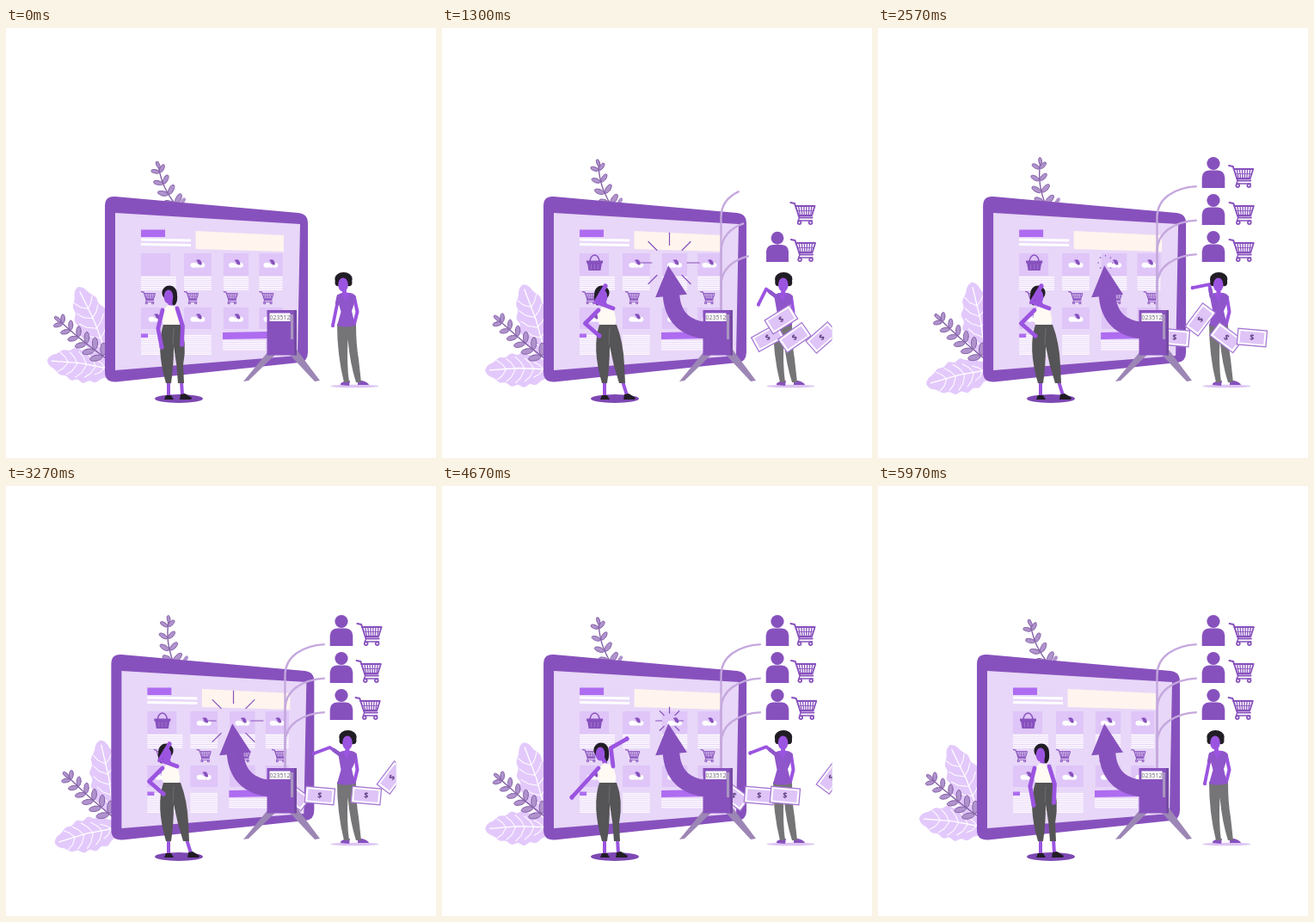
Recreate the animation shown at these times as an HTML page with a canvas. Size 500 px wide and 500 px high, loop 6 s.

```html
<!DOCTYPE html>
<html lang="en">
<head>
<meta charset="utf-8">
<title>Online shop</title>
<style>
html, body { margin: 0; width: 100%; height: 100%; overflow: hidden; background: #fff; }
canvas { display: block; width: 500px; height: 500px; }
</style>
</head>
<body>
<canvas id="stage" width="500" height="500"></canvas>
<script>
const c = document.getElementById('stage').getContext('2d');
const LOOP = 6000, TAU = Math.PI * 2;
const DARK = '#8751bd', BRIGHT = '#ae6cf0', SKIN = '#9b54e0', PALE = '#e3c9fb';
const INK = '#211d25', RULE = '#c5a8de', LEG = '#9c86b5', TOP = '#8f55ca';

const clamp = v => Math.max(0, Math.min(1, v));
const ease = u => u * u * (3 - 2 * u);
const ramp = (t, a, b) => ease(clamp((t - a) / (b - a)));
const mix = (a, b, u) => a + (b - a) * u;
const mixPt = (p, q, u) => [mix(p[0], q[0], u), mix(p[1], q[1], u)];
const rad = d => d * Math.PI / 180;

function trace(pts) {
  c.beginPath();
  for (let i = 0; i < pts.length; i += 2) c.lineTo(pts[i], pts[i + 1]);
}

function poly(pts, fill) {
  trace(pts);
  c.fillStyle = fill;
  c.fill();
}

function line(pts, color, width, cap = 'round') {
  trace(pts);
  c.strokeStyle = color;
  c.lineWidth = width;
  c.lineCap = cap;
  c.lineJoin = 'round';
  c.stroke();
}

function oval(x, y, rx, ry, fill, turn = 0) {
  c.beginPath();
  c.ellipse(x, y, rx, ry, turn, 0, TAU);
  c.fillStyle = fill;
  c.fill();
}

function rect(x, y, w, h, fill) {
  c.fillStyle = fill;
  c.fillRect(x, y, w, h);
}

function shape(d, fill) {
  c.fillStyle = fill;
  c.fill(new Path2D(d));
}

function label(text, x, y, font, color) {
  c.font = font + ' "Open Sans", "Noto Sans", sans-serif';
  c.fillStyle = color;
  c.textAlign = 'center';
  c.textBaseline = 'middle';
  c.fillText(text, x, y);
}

function at(x, y, turn, scale, draw) {
  c.save();
  c.translate(x, y);
  c.rotate(rad(turn));
  c.scale(scale, scale);
  draw();
  c.restore();
}

// Leaf growing upward from the current point
function leaf(len, half) {
  const left = [], right = [];
  const width = s => half * Math.pow(Math.max(0, Math.sin(Math.PI * Math.pow(s, 0.85))), 0.6) *
    (1 + 0.08 * Math.sin(s * 34));
  for (let i = 0; i <= 40; i++) {
    const s = i / 40;
    left.push(-width(s), -len * s);
    right.unshift(width(s), -len * s);
  }
  poly(left.concat(right), PALE);
  line([0, 0, 2, -len * 0.5, 0, -len * 0.93], '#fff', 1.3);
  for (let s = 0.12; s < 0.82; s += 0.14)
    for (const k of [-1, 1])
      line([1, -len * s, k * width(s) * 0.45, -len * (s + 0.06), k * width(s) * 0.75, -len * (s + 0.14)], '#fff', 1);
}

function sprig(len, pairs, size, bow) {
  const stemX = s => -bow * Math.sin(Math.PI * s);
  const blade = (x, y, turn, r) => {
    oval(x, y, r * 0.45, r, '#b093cd', rad(turn));
    c.strokeStyle = '#8460a6';
    c.lineWidth = 0.9;
    c.stroke();
  };
  const stem = [];
  for (let s = 0; s <= 1; s += 0.1) stem.push(stemX(s), -len * s);
  line(stem, '#8460a6', 1.4);
  for (let i = 0; i < pairs; i++) {
    const s = (i + 0.4) / pairs, r = size * (1 - s * 0.35);
    for (const k of [-1, 1]) blade(stemX(s) + k * r * 0.9, -len * s - r * 0.55, k * 52, r);
  }
  blade(0, -len, 0, size * 0.6);
}

function plants(k, dx) {
  at(118 + dx, 382, -23 + 13 * k, 1, () => leaf(88, 19));
  at(124 + dx, 397, -82 - 22 * k, 1, () => leaf(77, 19));
  at(116 + dx, 384, -51 + 3 * k, 1, () => sprig(72, 6, 7.5, 1));
  at(200 - k * 4, 209, -25 + 18 * k, 1, () => sprig(55, 4, 6.8, 4));
  oval(206 + k * 3, 201, 2.2, 4, '#b093cd', 0.6);
}

function cart(x, y, scale, alpha = 1) {
  c.save();
  c.globalAlpha = alpha;
  at(x, y, 0, scale, () => {
    line([0.8, 1, 5.5, 2, 11, 18.5, 26, 18.5], DARK, 2);
    line([6.5, 5, 29, 5, 25.5, 16, 10, 16], DARK, 1.8);
    for (let i = 0; i < 6; i++) line([10 + i * 3.1, 5, 12 + i * 2.4, 16], DARK, 1.3);
    line([9, 10.5, 27, 10.5], DARK, 0.8);
    line([11, 18.5, 9.5, 22, 26, 22], DARK, 1.4);
    for (const wx of [11, 24]) {
      oval(wx, 24.2, 2.7, 2.7, DARK);
      oval(wx, 24.2, 1, 1, '#fff');
    }
  });
  c.restore();
}

function stripes(x, y, w, n) {
  for (let i = 0; i < n; i++) rect(x, y + i * 2.4, w, 1.4, 'rgba(255,255,255,.9)');
}

function picture(x, y) {
  for (const k of [-1, 1]) oval(x + k * 4.5, y + 1.7, 4, 3, '#fff');
  shape(`M${x - 2} ${y - 4}q6 -3 7 5l-4 1l-1 -4z`, DARK);
  oval(x, y + 2.5, 2.6, 2.2, '#fff');
}

function basket(x, y, s) {
  at(x, y, 0, s, () => {
    c.beginPath();
    c.ellipse(0, -1, 5.5, 8, 0, Math.PI, TAU);
    c.strokeStyle = DARK;
    c.lineWidth = 1.5;
    c.stroke();
    rect(-9.5, -2.5, 19, 3, DARK);
    poly([-8.5, 0, 8.5, 0, 7, 9, -7, 9], DARK);
    for (const bx of [-4, 0, 4]) line([bx, 2, bx, 7], '#a77bd4', 0.8);
  });
}

function tablet(t, k, dx) {
  const colX = i => 157 + 50 * i - 2.1 * i * (i - 1);
  c.save();
  c.translate(dx, 0);
  shape('M115 207Q115 195 127 196L340 215Q351 216 351 227L351 377Q351 388 341 389L128 411.5Q115 412 115 400Z', DARK);
  poly([127, 215, 342, 228, 339, 381, 127, 398], '#e8d7f8');
  rect(157, 234.5, 28, 8.5, BRIGHT);
  line([157, 246, 215, 247], '#fff', 3, 'butt');
  line([157, 251.5, 215, 252.5], '#fff', 3, 'butt');
  poly([220.5, 236, 323, 241, 323, 260, 220.5, 257], '#fff5ee');
  for (let i = 0; i < 4; i++) {
    const x = colX(i), w = 34 - 2.3 * i;
    rect(x, 262, w, 26, '#dfc5f8');
    rect(x, 325, w, 25, '#dfc5f8');
    stripes(x, 289, i ? w : w + 7, 7);
    if (i) picture(x + w / 2, 274);
    picture(x + w / 2, 337);
    if (i < 2) stripes(x, 357, i ? w : w + 7, 10);
  }
  rect(157, 355.5, 8, 4.5, BRIGHT);
  poly([252, 354, 304, 353, 304, 361, 252, 362], BRIGHT);
  stripes(252, 363.5, 50, 5);
  basket(174.5, 273, ramp(t, 250, 650));
  c.restore();
  for (let i = 0; i < 4; i++) cart(colX(i) + 15 * k, 306, 0.57);
}

function links(t) {
  const u = 1 - Math.pow(1 - clamp((t - 350) / 1600), 2.1);
  if (!u) return;
  c.strokeStyle = RULE;
  c.lineWidth = 2.3;
  c.lineCap = 'butt';
  for (let i = 0; i < 3; i++) {
    const end = 263 - 39.5 * i, bend = end + 36;
    c.setLineDash([(393 - bend) * u, 400]);
    c.stroke(new Path2D(`M324.5 328V${bend}C324.5 ${bend - 22} 345 ${end + 1} 372.5 ${end}`));
  }
  c.setLineDash([]);
}

function arrow(t) {
  const u = ramp(t, 60, 760);
  if (!u) return;
  const bez = (s, a, b, d, e) => mix(
    mix(mix(a, b, s), mix(b, d, s), s), mix(mix(b, d, s), mix(d, e, s), s), s);
  const pts = [];
  for (let i = 0; i <= 30; i++) {
    const s = u * i / 30;
    pts.push(bez(s, 312, 284, 268.5, 266.5), bez(s, 352, 351, 337, 311));
  }
  line(pts, DARK, 19.5, 'butt');
  const [x0, y0, x, y] = pts.slice(-4);
  const turn = Math.atan2(y - y0, x - x0) * 360 / TAU + 90;
  at(x, y, turn, mix(0.5, 1, u), () => poly([0, -35, 18.5, 0.5, -18.5, 0.5], DARK));
}

function clicks(t) {
  const u = ((t - 580) % 1980) / 1200;
  if (u < 0 || u > 1) return;
  const outer = 8 + 29 * (1 - Math.pow(1 - u, 2.75));
  const inner = Math.min(8 + 27 * Math.pow(u, 1.5), outer);
  for (let i = 0; i < 8; i++)
    at(264.5, 273, i * 45, 1, () => line([inner, 0, outer, 0], DARK, 1.2));
}

function machine() {
  poly([305, 376, 313, 380, 282, 410, 276, 411], LEG);
  poly([330, 380, 338, 374, 365, 410, 359, 411], LEG);
  rect(303.5, 328, 34.5, 52.5, DARK);
  rect(335, 328, 3, 52.5, '#744aa3');
  rect(331, 333, 3, 29, '#a995bf');
  rect(306.5, 331.5, 24, 9.5, '#fff');
  label('023512', 318.5, 336.7, '7px', '#6d6474');
}

function bill() {
  rect(-17.5, -10, 35, 20, '#a678d3');
  rect(-16.2, -8.7, 32.4, 17.4, '#fff');
  rect(-14, -6.8, 28, 13.6, '#dfc4f7');
  label('$', 0, 0.5, 'bold 9px', '#5f3d82');
}

// Three quick bills, then batches of five; crossing is when a bill passes x = 395
function bills(t) {
  const tilts = [5, -53, 37, 5];
  c.save();
  c.beginPath();
  c.rect(320, 300, 133.5, 110);
  c.clip();
  for (let i = 0; i < 14; i++) {
    const n = i - 3;
    const crossing = n < 0 ? 1140 + 155 * i : 1770 + 1740 * Math.floor(n / 5) + 300 * (n % 5);
    const d = t - crossing, x = 395 - 0.1 * d;
    if (x < 329 || x > 478) continue;
    const tilt = i < 4 ? -32 + 0.02 * d : tilts[i % 4];
    at(x, i % 4 === 1 ? 339 : 360, tilt, 1, bill);
  }
  c.restore();
}

function buyers(t) {
  for (let i = 0; i < 3; i++) {
    const y = 272 - 43 * i, sway = Math.cos(TAU * (2 * t / LOOP + 0.2 - 0.1 * i));
    at(390, y, 0, ramp(t, 1030 + 285 * i, 1330 + 285 * i), () => {
      oval(0, -28.5, 7.6, 7.6, DARK);
      shape('M-13.3 0V-12Q-13 -20 -5 -20.5H5Q13 -20 13.3 -12V0Z', DARK);
    });
    cart(406.2 + 1.7 * sway, y - 27, 1, ramp(t, 800 + 250 * i, 980 + 250 * i));
  }
}

// Two-bone arm; side picks where the elbow bends
function arm([sx, sy], [hx, hy], upper, lower, side, width) {
  const dx = hx - sx, dy = hy - sy, dist = Math.hypot(dx, dy);
  const along = (upper * upper - lower * lower + dist * dist) / (2 * dist);
  const out = side * Math.sqrt(Math.max(0, upper * upper - along * along));
  const ex = sx + (dx * along + dy * out) / dist, ey = sy + (dy * along - dx * out) / dist;
  line([sx, sy, ex, ey, hx, hy], SKIN, width);
  oval(hx, hy, width * 0.52, width * 0.58, SKIN);
  return [ex, ey];
}

function shopper(t) {
  const wave = ramp(t, 4100, 4670), back = ramp(t, 4670, 5500);
  const hold = ramp(t, 0, 700) * (1 - wave);
  const blend = (rest, held, waved) => mixPt(mixPt(rest, held, hold), waved, wave * (1 - back));
  const [hx, hy] = blend([190, 311], [186, 311], [185, 310]);
  const foot = 204 + 6 * hold;
  const side = 1 - 2 * hold;

  oval(201, 431, 28, 5, '#7d48b3');
  line([189, 411, 189, 428], SKIN, 4);
  line([foot, 411, foot + 4 * hold + 1, 427], SKIN, 4);
  shape('M186 427h6l3 5h-11z', INK);
  shape(`M${foot - 1 + 3 * hold} 426l5 -1l8 5l-1 2h-13z`, INK);
  oval(hx + side * 5, hy + 2, 4.2, 9.5, INK);
  line([hx + 1, hy + 5, 191, 325], SKIN, 5);
  shape(`M181 326Q186 327 188 322L194 323Q196 326 199 324L202 337Q203 342 200 347H184Q180 340 181 326Z`, '#fffaf3');
  shape(`M183 345H203Q211 366 ${foot + 2} 392L${foot + 3} 413H${foot - 4}Q199 392 195 370Q195 393 192 413H186Q174 372 183 345Z`, '#555456');
  line([195, 349, 194, 368], '#77727a', 0.8);
  arm([182, 328], blend([181, 371], [183, 358], [151, 362]), 22, 22, -1, 4.8);
  const hand = blend([204.5, 368], [190, 300], [215, 294]);
  oval(hx, hy - 3, 8.6, 8.4, INK);
  oval(hx - side, hy + 1.5, 5.3, 8, SKIN);
  arm([199, 326], hand, 21.5, 21.5, 1, 4.8);
}

function payer(t) {
  const raise = ramp(t, 870, 1600) * (1 - ramp(t, 4700, 5700));
  const swing = Math.cos(TAU * (t - 2150) / 3600);
  const hand = mixPt([380, 346], [360.5 + 7 * swing, 308 - 8 * swing], raise);
  const hx = 395.5 - 3 * Math.cos(TAU * 3 * t / LOOP), hy = 296.5;
  const o = (hx - 393) * 0.25;

  oval(405.5, 416.5, 28, 1.8, '#dcc3f3');
  shape('M389 415q-1 -3 8 -5h3l-1 6z', DARK);
  shape('M409 410h5q7 2 8 5h-13z', DARK);
  shape('M385 344H407Q407 368 410 385L413 412H407Q400 390 397.5 362Q396 390 399 412H393Q385 380 385 344Z', '#757476');
  line([hx, hy + 6, 395 + o, 313], SKIN, 5);
  line([405 + o, 313, 408.5, 330, 405, 344], SKIN, 4);
  shape(`M${385 + o} 311Q${390 + o} 307 ${395 + o} 308Q${403 + o} 307 ${407 + o} 312Q${405 + o} 322 402 329L406 346Q395 349 385 346L389.5 330Q${387 + o} 322 ${385 + o} 311Z`, TOP);
  poly([390 + o, 308, 400 + o, 308, 395 + o, 318], SKIN);
  const shoulder = [387 + o, 312];
  const elbow = arm(shoulder, hand, 14, 20, -1, 3.8);
  line([...shoulder, ...mixPt(shoulder, elbow, 0.6)], TOP, 4.6);
  oval(hx, hy - 4.5, 10.2, 8, INK);
  for (const k of [-1, 1]) oval(hx + k * 6, hy - 0.5, 4, 4.2, INK);
  oval(hx - 0.5, hy + 2, 5.8, 8, SKIN);
}

function frame(t) {
  const k = (1 - Math.cos(TAU * t / LOOP)) / 2, dx = 7.5 * k;
  rect(0, 0, 500, 500, '#fff');
  plants(k, dx);
  tablet(t, k, dx);
  links(t);
  arrow(t);
  clicks(t);
  shopper(t);
  payer(t);
  bills(t);
  machine();
  buyers(t);
}

const start = performance.now();
function tick() {
  frame((performance.now() - start) % LOOP);
  requestAnimationFrame(tick);
}
tick();
</script>
</body>
</html>
```
